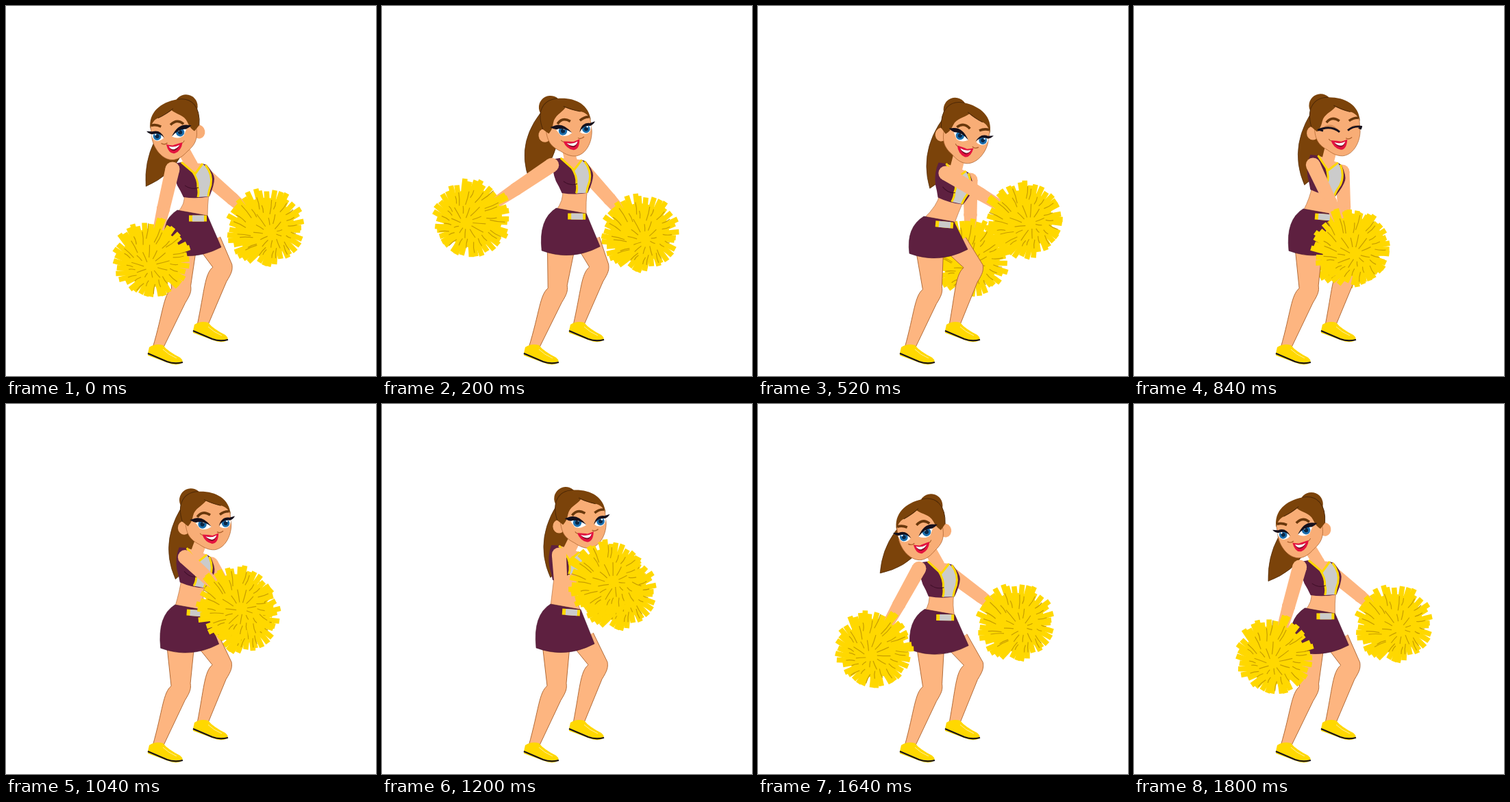
An HTML page with a canvas for the animation above (1840 ms loop, 540 by 540 pixels).

```html
<!DOCTYPE html>
<html lang="en">
<head>
<meta charset="utf-8">
<title>Cheerleader</title>
<style>
html, body { margin: 0; width: 100%; height: 100%; overflow: hidden; background: #fff; }
canvas { display: block; width: 540px; height: 540px; }
</style>
</head>
<body>
<canvas id="stage" width="540" height="540"></canvas>
<script>
const g = document.getElementById('stage').getContext('2d');
const LOOP = 1840, STEP = 40, TAU = Math.PI * 2, DEG = Math.PI / 180;
const SKIN = '#fdb580', FACE = '#f8ad76', EDGE = '#a9602c', HAIR = '#7b430a', DARK = '#4d2806';
const PLUM = '#5e2040', GREY = '#cbcbcb', GOLD = '#ffd800', GOLD_DARK = '#c79d00', INK = '#15101c';

// Key poses: time, head x y tilt, neck x y lean, belt x y, near arm angle, reach, far arm angle, ponytail angle
const NEAR = 9;
const POSES = [
  [0, 250, 184, -10, 270, 228, 0, 280, 310, 103, .99, 41, 120],
  [360, 284, 179, 0, 279, 218, 4, 286, 305, 219, 1.07, 57, 130],
  [520, 299, 189, 12, 288, 234, 17, 272, 319, 391, .98, 90, 122],
  [840, 292, 180, -1, 282, 222, 16, 277, 308, 425, .98, 87, 118],
  [1200, 289, 172, -3, 272, 210, 14, 276, 304, 387, .57, 41, 118],
  [1440, 260, 220, -2, 252, 258, 33, 238, 344, 458, 1, 46, -6],
  [1680, 241, 184, -14, 264, 228, 0, 277, 309, 480, .99, 36, 148]];

// Monotone cubic through the looping poses; the near arm gains a full turn per lap.
function poseAt(t) {
  const n = POSES.length;
  let k = n - 1;
  while (POSES[k][0] > t) k--;
  const value = (i, c) => {
    const lap = Math.floor(i / n), turn = c === 0 ? LOOP : c === NEAR ? 360 : 0;
    return POSES[i - lap * n][c] + lap * turn;
  };
  const gap = i => value(i + 1, 0) - value(i, 0), h = gap(k);
  const u = (t - value(k, 0)) / h, v = 1 - u;
  return POSES[0].map((_, c) => {
    const slope = i => (value(i + 1, c) - value(i, c)) / gap(i);
    const tangent = i => {
      const a = slope(i - 1), b = slope(i);
      return a * b > 0 ? 2 * a * b / (a + b) : 0;
    };
    return value(k, c) * (1 + 2 * u) * v * v + value(k + 1, c) * u * u * (3 - 2 * u)
      + h * u * v * (tangent(k) * v - tangent(k + 1) * u);
  });
}

function shape(d, fill, line, width = 1) {
  const p = new Path2D(d);
  if (fill) { g.fillStyle = fill; g.fill(p); }
  if (line) { g.strokeStyle = line; g.lineWidth = width; g.stroke(p); }
}

function disc(x, y, rx, fill, ry = rx) {
  g.beginPath();
  g.ellipse(x, y, rx, ry, 0, 0, TAU);
  g.fillStyle = fill;
  g.fill();
}

function placed(x, y, turn, draw, flip = 1) {
  g.save();
  g.translate(x, y);
  g.rotate(turn * DEG);
  g.scale(flip, 1);
  draw();
  g.restore();
}

// Point (u, v) of a frame at x, y turned by some degrees
function local(x, y, turn, u, v) {
  const c = Math.cos(turn * DEG), s = Math.sin(turn * DEG);
  return [x + u * c - v * s, y + u * s + v * c];
}

function taper(x1, y1, x2, y2, w1, w2) {
  const a = Math.atan2(y2 - y1, x2 - x1), nx = -Math.sin(a) / 2, ny = Math.cos(a) / 2;
  disc(x1, y1, w1 / 2, SKIN);
  disc(x2, y2, w2 / 2, SKIN);
  shape(`M${x1 + nx * w1},${y1 + ny * w1}L${x2 + nx * w2},${y2 + ny * w2}
    L${x2 - nx * w2},${y2 - ny * w2}L${x1 - nx * w1},${y1 - ny * w1}Z`, SKIN);
}

function pompom(x, y, dir, seed) {
  const rnd = () => (seed = seed * 16807 % 2147483647) / 2147483647;
  const dx = Math.cos(dir) * 14, dy = Math.sin(dir) * 14;
  const point = (r, a) => {
    const b = a + r / 150, m = 1 - r / 56;
    return [x + dx * m + r * Math.cos(b), y + dy * m + r * Math.sin(b)];
  };
  const strand = (r1, r2, a, color, width) => {
    g.beginPath();
    g.moveTo(...point(r1, a));
    g.quadraticCurveTo(...point((r1 + r2) / 2, a + .05), ...point(r2, a));
    g.strokeStyle = color;
    g.lineWidth = width;
    g.stroke();
  };
  disc(x, y, 43, GOLD);
  for (let i = 0; i < 38; i++) {
    strand(10, 50 + rnd() * 9, dir + (i + rnd() * .6) / 38 * TAU, GOLD, 7.6);
  }
  for (let i = 0; i < 36; i++) {
    const r = i % 3 ? 24 + rnd() * 10 : 7 + rnd() * 7;
    strand(r, r + 9 + rnd() * 10, dir + (i + rnd() * .7) / 36 * TAU, GOLD_DARK, 1.2);
  }
}

// The elbow drops out of line when a bending arm is pulled in.
function arm(x, y, angle, dist, bends, seed) {
  const dir = angle * DEG, c = Math.cos(dir), s = Math.sin(dir);
  const bend = bends ? Math.max(0, 98 - dist) * 1.8 : 0, along = dist * (bend ? .3 : .45);
  const ex = x + c * along - s * bend, ey = y + s * along + c * bend;
  const px = x + c * dist, py = y + s * dist;
  taper(x, y, ex, ey, 21, 19);
  taper(ex, ey, px - c * 25, py - s * 25, 19, 15);
  pompom(px, py, dir, seed);
}

function leg(hx, hy, kx, ky, ax, ay, w) {
  const a = Math.atan2(ky - hy, kx - hx), nx = -Math.sin(a) * w, ny = Math.cos(a) * w;
  const k = (x, y) => `${kx + x},${ky + y} `;
  shape(`M${hx + nx},${hy + ny} L${k(-12, -4)}C${k(-24, 6)}${k(-24, 30)}${ax - 8},${ay}
    L${ax + 8},${ay - 1} L${k(8, 17)}C${k(16, 4)}${k(17, 0)}${k(16, -8)}L${hx - nx},${hy - ny}`, SKIN, EDGE, .9);
}

function shoe(x, y) {
  placed(x, y, 0, () => {
    shape('M0,13L2,4Q11,-2 22,1Q29,10 47,19Q54,25 48,28Q40,31 30,27L0,16Z', GOLD);
    shape('M0,13L28,25Q39,29 51,26', null, INK, 2.2);
    shape('M22,7Q30,15 42,20', null, '#fff09a', 1);
  });
}

// Knees follow the hips a little; the hem rises as the hips sink.
function lowerBody(bx, by, neck) {
  const lift = (310 - by) * .65, dx = bx - 276, dy = by - 308;
  leg(bx + 16, by + 34 + lift, 313 + dx * .2, 385 + dy * .08, 287, 466, 18);
  shoe(273, 461);
  leg(bx - 22, by + 34 + lift, 253 + dx * .15, 416 + dy * .15, 222, 499, 21);
  shoe(207, 494);
  const at = (u, v) => local(...neck, u, v) + ' ';
  shape(`M${at(-10, 46)}L${at(26, 46)}Q${at(24, 62)}${bx + 14},${by}L${bx - 30},${by - 9}
    Q${at(-8, 62)}${at(-10, 46)}Z`, SKIN, EDGE, .6);
  placed(bx, by, 0, () => {
    shape(`M-30,-12Q-56,4 -51,${48 + lift}Q-8,${64 + lift} 34,${42 + lift}L14,-4Z`, PLUM, '#431229', .6);
  });
  placed(bx, by, neck[2] * .3, () => {
    g.fillStyle = GOLD;
    g.fillRect(-13, -4.5, 26, 9);
    g.fillStyle = GREY;
    g.fillRect(-8, -4.5, 17, 9);
  });
}

function bodice() {
  shape('M-14,0L17,2L6,18Z', SKIN);
  shape('M-25,2L-14,0L6,17L17,2L23,4Q34,17 34,24Q34,33 27,50Q8,54 -11,51Q-15,42 -20,34Q-27,18 -25,2Z', PLUM);
  shape('M3,13L6,17L17,2Q28,13 30,22Q31,32 25,50L10,51Q12,43 9,36Q10,24 3,13Z', GREY);
  shape('M-14,0L6,17L17,2M2,13Q11,26 10,37Q12,43 10,51M21,4Q32,18 29,33Q26,41 25,50', null, GOLD, 3);
  shape('M-9,34Q1,41 11,37', null, '#3d0e27', 1);
}

// A leaf from the crown to the tip, bowed more the further it flies out.
function ponytail(x, y, tilt, flip, angle) {
  const [rx, ry] = local(x, y, tilt, -22 * flip, -40);
  const swing = Math.cos(angle * DEG), length = 100 + 17 * swing;
  const dx = x + length * swing - rx, dy = y + length * Math.sin(angle * DEG) - ry;
  const size = Math.hypot(dx, dy), bow = 50 * Math.max(0, swing) - 8;
  const side = b => `${rx + dx * .55 - dy / size * b},${ry + dy * .55 + dx / size * b} `;
  shape(`M${rx},${ry}Q${side(bow + 44)}${rx + dx},${ry + dy}Q${side(bow - 44)}${rx},${ry}Z`, HAIR, DARK, .7);
}

function head(closed) {
  disc(-31, 5, 9, FACE, 10);
  disc(-19, -35, 17, HAIR);
  shape('M-28,-14C-30,10 -26,21 -10,30C-2,36 4,39 12,39C26,38 37,22 38,4L37,-16L20,-36H-20Z', FACE, EDGE, .7);
  shape(`M-25,3L-33,-4C-40,-30 -30,-47 -8,-47C16,-47 37,-36 38,-11C36,-18 30,-24 24,-25
    C14,-28 8,-30 3,-33C-4,-25 -14,-23 -17,-12C-19,-4 -21,-1 -25,3Z`, HAIR);
  shape('M-33,-4C-40,-30 -30,-47 -8,-47M0,-35Q10,-29 24,-25', null, DARK, 1);
  shape('M-11,-10Q-3,-20 8,-12M22,-12Q29,-17 36,-16', null, '#69380c', 3.6);
  if (closed) {
    shape('M-20,0Q-5,-15 8,3Q-5,-5 -20,0ZM20,1Q29,-10 40,-3Q30,-4 20,1Z', '#d88f58');
    shape('M-24,1Q-5,-7 8,4M-22,0L-16,2M20,2Q28,-5 41,-3M36,-2L40,0', null, INK, 2.8);
  } else {
    shape('M-14,-2Q-4,-11 9,5Q0,11 -8,7ZM21,5Q27,-9 38,-3Q37,7 30,8Q24,8 21,5Z', '#fff');
    for (const [x, r] of [[-4, 6.2], [30, 5.8]]) {
      disc(x, 1, r, '#1b6fae');
      disc(x, 1, r * .5, '#0b2745');
      disc(x + 2, -2, 1.3, '#fff');
    }
    shape('M-22,-6L-15,-8Q-2,-11 9,5Q-3,-5 -13,-2Q-18,-3 -22,-6ZM20,5Q24,-9 36,-7L44,-9Q41,-4 36,-3Q26,-5 20,5Z', INK);
  }
  shape('M17,13Q21,16 26,12', null, '#b0622f', 1.4);
  shape('M-5,16Q5,17 10,18Q14,17 19,15Q18,30 9,30Q-1,28 -5,16Z', '#e4123f');
  shape('M0,19Q9,22 16,18Q14,26 9,26Q3,25 0,19Z', '#7d0c24');
  shape('M0,19Q9,22 16,18Q14,24 9,24Q3,23 0,19Z', '#fff');
  shape('M-8,14Q-6,17 -4,17', null, EDGE, 1);
}

function draw(t) {
  g.fillStyle = '#fff';
  g.fillRect(0, 0, 540, 540);
  const [, hx, hy, tilt, nx, ny, lean, bx, by, near, reach, far, tail] = poseAt(t);
  const flip = t < 160 || t >= 1320 ? -1 : 1;
  ponytail(hx, hy, tilt, flip, tail);
  arm(nx + 22, ny + 20, far, 115 * reach, false, 4711);
  lowerBody(bx, by, [nx, ny, lean]);
  taper(hx, hy + 10, nx + 1, ny + 4, 18, 18);
  placed(nx, ny, lean, bodice);
  placed(hx, hy, tilt, () => head(t >= 720 && t < 960), flip);
  // The shoulder comes forward with the arm.
  const forward = 15 * Math.max(0, Math.cos(near * DEG));
  arm(nx - 27 + forward, ny + 10, near, 134 * reach, true, 90210);
}

const start = performance.now();
function tick() {
  let t = Math.floor(Math.max(0, performance.now() - start) % LOOP / STEP) * STEP;
  if (t === 1480) t = 1440; // the squat is held for two steps
  draw(t);
  requestAnimationFrame(tick);
}
tick();
</script>
</body>
</html>
```
